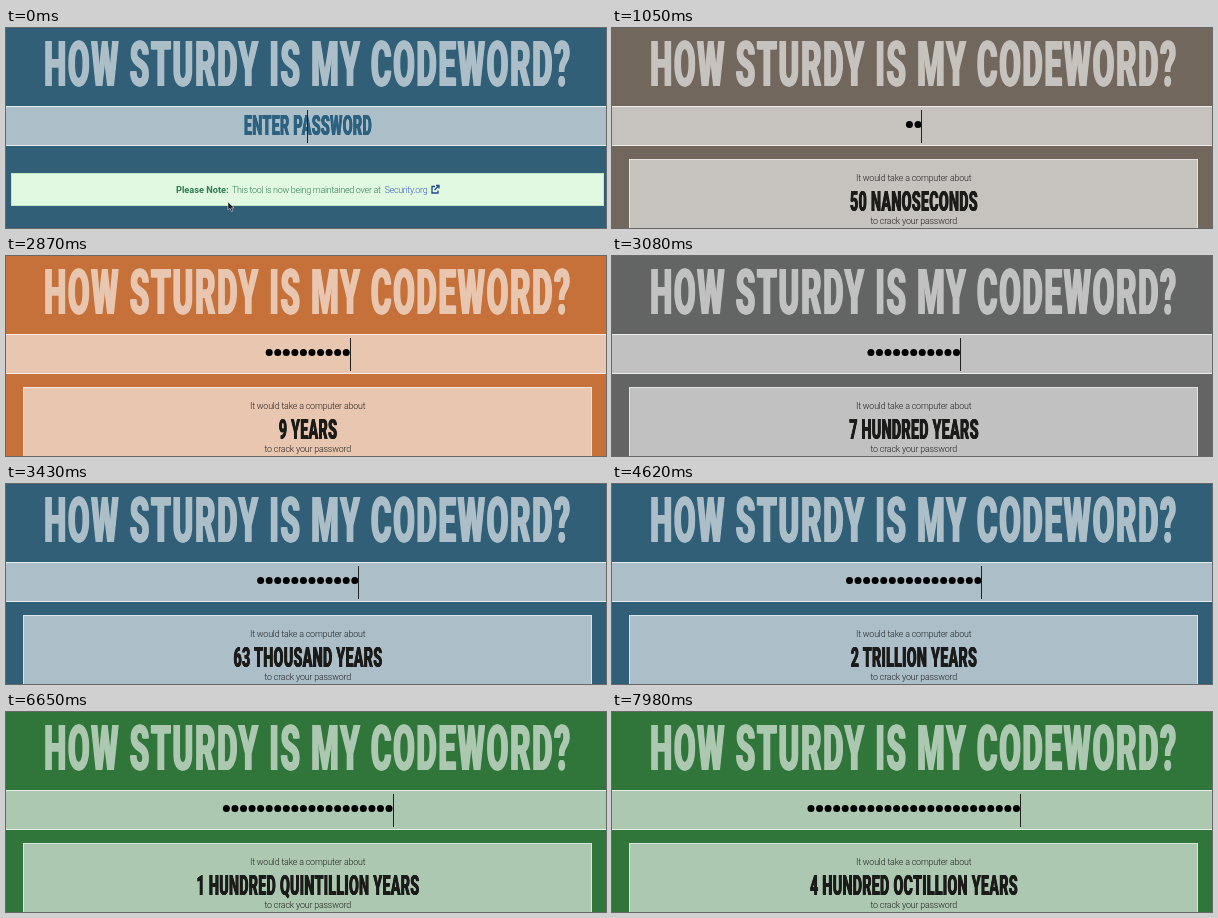
Recreate the animation shown at these times as an HTML page. Size 600 px wide and 200 px high, loop 8 s.

```html
<!DOCTYPE html>
<html lang="en">
<head>
<meta charset="utf-8">
<title>Password strength</title>
<style>
html, body { margin: 0; width: 100%; height: 100%; overflow: hidden; }
body { font-family: Roboto, "Liberation Sans", sans-serif; }
#stage {
  position: relative; width: 600px; height: 200px; overflow: hidden;
  background: #305f77; animation: mood 8s infinite linear;
}
@keyframes mood {
  0% { background: #305f77; }
  11% { background: #305f77; animation-timing-function: ease; }
  19.75% { background: #d77333; }
  35% { background: #d77333; animation-timing-function: ease; }
  43.5% { background: #305f77; }
  64.6% { background: #305f77; animation-timing-function: ease; }
  73.4%, 100% { background: #30753a; }
}
#stage div, #stage svg { position: absolute; box-sizing: border-box; }
#stage .tall {
  left: 301.7px; white-space: nowrap; line-height: 1;
  font-size: 28.5px; font-weight: 900; letter-spacing: .02em;
  transform: translateX(-50%) scaleX(.5);
  color: #1b1b19; text-shadow: .02em 0, -.02em 0;
}
#stage .title {
  left: 302.3px; top: 4.5px; font-size: 63px; letter-spacing: .051em;
  color: #fff; opacity: .6;
}
.field, .panel { background: rgba(255, 255, 255, .6); border: 1px solid rgba(255, 255, 255, .7); }
.field { left: -1px; top: 78px; width: 602px; height: 40px; }
.panel { left: 17px; top: 131px; width: 569px; height: 90px; border-color: rgba(255, 255, 255, .55); }
.hint { top: 83.5px; }
#stage .hint { color: #2c6280; }
.time { top: 160px; }
.thin {
  left: 0; width: 603.4px; text-align: center; white-space: nowrap;
  font-size: 8.9px; line-height: 10px; font-weight: 300; letter-spacing: -.18px; color: #222;
}
.note {
  left: 5px; top: 145px; width: 593px; height: 33px;
  background: #e1f9e0; border: 1px solid #c3e6c6;
}
#stage svg { left: 0; top: 0; }
#stage text { font-size: 9px; font-weight: 300; letter-spacing: -.3px; fill: #2f7d54; }
#stage .bold { font-size: 9.2px; font-weight: 700; letter-spacing: 0; }
#stage .link { fill: #3a5fc4; }
.mouse { animation: drift 8s infinite linear; }
@keyframes drift {
  0%, .8% { transform: translate(222px, 174px); animation-timing-function: ease-out; }
  4.4%, 100% { transform: translate(222px, 168px); }
}
[hidden] { display: none !important; }
</style>
</head>
<body>
<div id="stage">
  <div class="tall title">HOW STURDY IS MY CODEWORD?</div>
  <div class="field"></div>

  <div id="idle" style="left:0;top:0">
    <div class="tall hint">ENTER PASSWORD</div>
    <div class="note"></div>
    <svg width="600" height="200">
      <text class="bold" x="170" y="164.5">Please Note:</text>
      <text x="226" y="164.5">This tool is now being maintained over at</text>
      <text class="link" x="378.5" y="164.5">Security.org</text>
      <path d="M429 158.5h-3v6.5h6v-2.5M428.5 162l4-4M430 157.5h3v3" fill="none" stroke="#24478f" stroke-width="1.3"/>
      <path class="mouse" d="M0 0v8l2-1.7 1.5 3.2 1.4-.6-1.4-3.1h2.6z" fill="#111" stroke="#fff" stroke-width=".5"/>
    </svg>
  </div>

  <div id="result" style="left:0;top:0" hidden>
    <div class="panel"></div>
    <div class="thin" style="top:145px">It would take a computer about</div>
    <div class="tall time" id="time"></div>
    <div class="thin" style="top:187.5px">to crack your password</div>
  </div>

  <svg width="600" height="200">
    <g id="dots" fill="#000"></g>
    <rect id="caret" y="82" width="1" height="33" fill="#222"/>
  </svg>
</div>
<script>
const LOOP = 8000, BLINK = 490, MID = 301.7, PITCH = 8.56;
const keys = [770, 980, 1190, 1400, 1610, 1820, 2030, 2240, 2450, 2660, 2940, 3290, 3570,
  3850, 4200, 4620, 5040, 6160, 6370, 6580, 6860, 7070, 7350, 7630, 7840];
const times = ['1 nanosecond', '50 nanoseconds', '7 microseconds', '6 hundred microseconds',
  '50 milliseconds', '4 seconds', '5 minutes', '8 hours', '4 weeks', '9 years',
  '7 hundred years', '63 thousand years', '5 million years', '4 hundred million years',
  '35 billion years', '2 trillion years', '2 hundred trillion years', '16 quadrillion years',
  '1 quintillion years', '1 hundred quintillion years', '9 sextillion years',
  '7 hundred sextillion years', '60 septillion years', '5 octillion years',
  '4 hundred octillion years'];
const $ = id => document.getElementById(id);
let start, shown = -1;

function type(n) {
  $('idle').hidden = n > 0;
  $('result').hidden = n === 0;
  $('time').textContent = n ? times[n - 1].toUpperCase() : '';
  let dots = '';
  for (let i = 0; i < n; i++) {
    const x = MID + (i - (n - 1) / 2) * PITCH;
    dots += `<circle cx="${x.toFixed(2)}" cy="96.6" r="3.5"/>`;
  }
  $('dots').innerHTML = dots;
  $('caret').setAttribute('x', Math.floor(MID + n * PITCH / 2 - .3));
  shown = n;
}

function draw(now) {
  start ??= now;
  const t = (now - start) % LOOP;
  const n = keys.filter(k => k <= t).length;
  if (n !== shown) type(n);
  const idle = t - (n ? keys[n - 1] : 0);
  $('caret').style.opacity = idle % (2 * BLINK) < BLINK ? 1 : 0;
  requestAnimationFrame(draw);
}
type(0);
requestAnimationFrame(draw);
</script>
</body>
</html>
```
